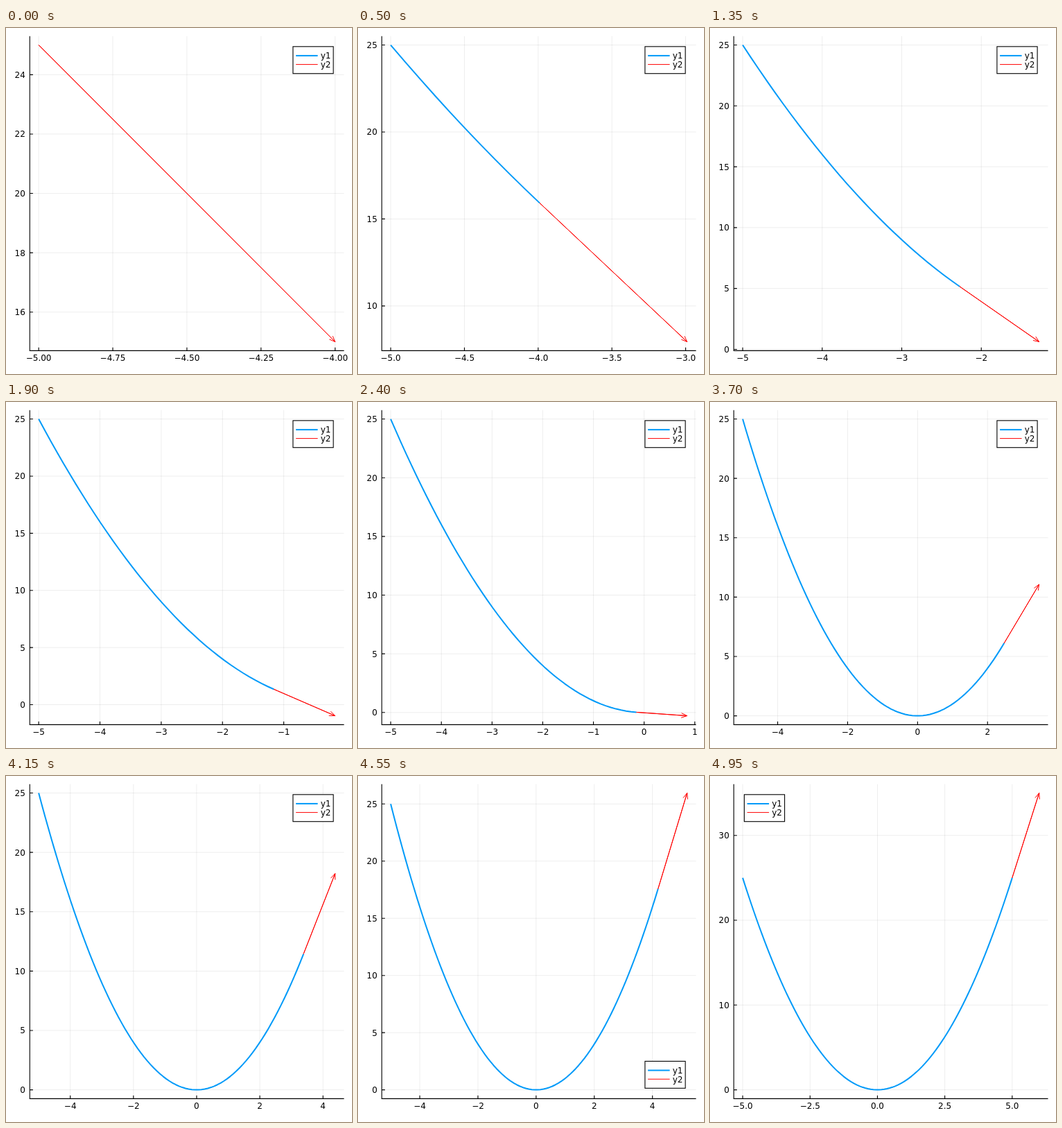
These frames come from a looping animation (499 px wide and 499 px high, 5 s). An HTML page:

```html
<!DOCTYPE html>
<html lang="en">
<head>
<meta charset="utf-8">
<style>
  html, body { margin: 0; width: 100%; height: 100%; overflow: hidden; background: #fff; }
  svg { display: block; }
  text { font: 12px "DejaVu Sans", sans-serif; }
  path { fill: none; }
  .grid { stroke: #000; stroke-opacity: .1; stroke-width: .7; }
  .axis { stroke: #000; stroke-width: 1.1; }
  .curve { stroke: #009af9; stroke-width: 2; stroke-linejoin: round; }
  .arrow { stroke: #f00; stroke-width: 1; }
  .box { fill: #fff; stroke: #000; stroke-width: 1.1; }
</style>
</head>
<body>
<svg id="plot" width="499" height="499" viewBox="0 0 499 499"></svg>
<script>
const STEPS = 100, STEP_MS = 50;
const LEFT = 34.3, RIGHT = 487.5, TOP = 11.7, BOTTOM = 465.4;
const NICE = [[1, 1], [5, .9], [2, .7], [2.5, .5], [3, .2]];
const plot = document.getElementById('plot');

const sample = i => -5 + 10 * i / (STEPS - 1);
const line = (x1, y1, x2, y2) =>
  `M${x1.toFixed(2)} ${y1.toFixed(2)}L${x2.toFixed(2)} ${y2.toFixed(2)}`;
const path = (cls, d) => `<path class="${cls}" d="${d}"/>`;
const text = (x, y, anchor, str) =>
  `<text x="${x.toFixed(2)}" y="${y.toFixed(2)}" text-anchor="${anchor}">${str}</text>`;

// Data extent widened by 3% on both sides
function limits(values) {
  const lo = Math.min(...values), hi = Math.max(...values), pad = (hi - lo) * .03;
  return [lo - pad, hi + pad];
}

// Best-scoring set of 4 to 8 round ticks inside the limits
function findTicks([lo, hi]) {
  const span = hi - lo, top = Math.ceil(Math.log10(span));
  let best = { score: -Infinity };
  for (let z = top; z > top - 3; z--) {
    for (let k = 4; k <= 16; k++) {
      for (const [q, nice] of NICE) {
        const step = q * 10 ** z, wide = (k - 1) * step;
        for (let r = Math.ceil((hi - wide) / step); r * step <= lo; r++) {
          const first = Math.ceil(lo / step), last = Math.floor(hi / step);
          const n = last - first + 1;
          if (n < 4 || n > 8) continue;
          const hasZero = r <= 0 && -r < k ? 1 : 0;
          const score = (1 - Math.abs(n - 5) / 5) / 4 + hasZero / 6 +
            span / ((n - 1) * step) / 2 + nice / 4 - (wide >= 2 * span ? 1000 : 0);
          if (score > best.score + 1e-9) best = { score, step, first, n };
        }
      }
    }
  }
  const values = Array.from({ length: best.n }, (_, i) => (best.first + i) * best.step);
  const exact = d => values.every(v => Math.abs(v - v.toFixed(d)) < 1e-6);
  const digits = [0, 1, 2, 3].find(exact);
  return values.map(v => [v, v.toFixed(digits).replace(/^-(?=.*[1-9])/, '\u2212').replace(/^-/, '')]);
}

// First corner, in order of preference, that holds no data point
function freeCorner(points) {
  const corners = [[1, 1], [0, 1], [1, 0], [0, 0]];
  const near = (v, side) => side ? v >= .75 : v <= .25;
  return corners.find(([cx, cy]) => !points.some(([u, v]) => near(u, cx) && near(v, cy))) || corners[0];
}

function legend([right, top]) {
  const x = right ? 413.9 : 49.4, y = top ? 26.8 : 411.4;
  return `<rect class="box" x="${x}" y="${y}" width="58.2" height="38.9"/>` +
    path('curve', line(x + 4.2, y + 13.1, x + 35.7, y + 13.1)) +
    path('arrow', line(x + 4.2, y + 25.8, x + 35.7, y + 25.8)) +
    text(x + 39.8, y + 17.6, 'start', 'y1') + text(x + 39.8, y + 30.4, 'start', 'y2');
}

function arrow(x1, y1, x2, y2) {
  const back = Math.atan2(y1 - y2, x1 - x2);
  const arm = turn => line(x2, y2, x2 + 9 * Math.cos(back + turn), y2 + 9 * Math.sin(back + turn));
  const shaft = line(x1, y1, x2, y2);
  return path('arrow', shaft) + path('arrow', shaft + arm(.38) + arm(-.38));
}

function draw(n) {
  const pts = Array.from({ length: n + 1 }, (_, i) => [sample(i), sample(i) ** 2]);
  const [x, y] = pts[n], tip = [x + 1, y + 2 * x];
  const all = [...pts, tip];
  const xl = limits(all.map(p => p[0])), yl = limits(all.map(p => p[1]));
  const fx = v => (v - xl[0]) / (xl[1] - xl[0]), fy = v => (v - yl[0]) / (yl[1] - yl[0]);
  const px = v => LEFT + (RIGHT - LEFT) * fx(v), py = v => BOTTOM - (BOTTOM - TOP) * fy(v);

  let grid = '', labels = '';
  let axis = line(LEFT, TOP, LEFT, BOTTOM + .5) + line(LEFT, BOTTOM, RIGHT, BOTTOM);
  for (const [v, label] of findTicks(xl)) {
    const at = px(v);
    grid += line(at, TOP, at, BOTTOM);
    axis += line(at, BOTTOM, at, BOTTOM - 4.6);
    labels += text(at, 480.2, 'middle', label);
  }
  for (const [v, label] of findTicks(yl)) {
    const at = py(v);
    grid += line(LEFT, at, RIGHT, at);
    axis += line(LEFT, at, LEFT + 4.6, at);
    labels += text(27.8, at + 4.5, 'end', label);
  }
  const curve = 'M' + pts.map(p => px(p[0]).toFixed(2) + ' ' + py(p[1]).toFixed(2)).join('L');

  plot.innerHTML = path('grid', grid) + path('axis', axis) + labels +
    (n ? path('curve', curve) : '') + arrow(px(x), py(y), px(tip[0]), py(tip[1])) +
    legend(freeCorner(all.map(p => [fx(p[0]), fy(p[1])])));
}

let shown = -1;
const start = performance.now();
function tick() {
  const n = Math.floor(Math.max(0, performance.now() - start) / STEP_MS) % STEPS;
  if (n !== shown) draw(shown = n);
  requestAnimationFrame(tick);
}
tick();
</script>
</body>
</html>
```
